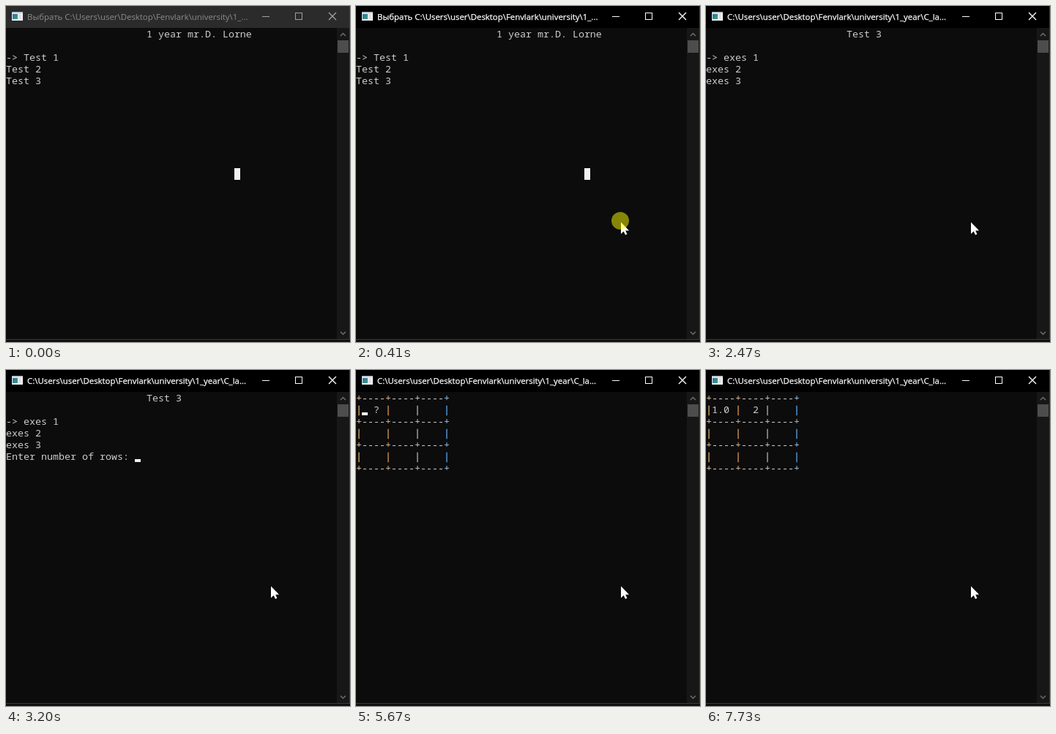
An HTML page that plays this animation: 470x460 px, repeating every 8000 ms.

```html
<!DOCTYPE html>
<html lang="en">
<head>
<meta charset="utf-8">
<title>Console menu</title>
<style>
  html, body { margin: 0; width: 100%; height: 100%; overflow: hidden; background: #0c0c0c; }
  svg { display: block; width: 470px; height: 460px; }
  text { white-space: pre; }
  .mono { font: 13.333px "Noto Sans Mono", "DejaVu Sans Mono", monospace; fill: #ccc; }
  #title { font: 11.4px "Open Sans", "Noto Sans", sans-serif; stroke-width: .25; }
  #bar { fill: #2b2b2b; }
  #title { fill: #8c8c8c; }
  #buttons { fill: none; stroke: #a0a0a0; }
  .active #bar { fill: #000; }
  .active #title { fill: #fff; stroke: #fff; }
  .active #buttons { stroke: #fff; }
  .plus { fill: color-mix(in srgb, var(--tint) 55%, #ddd); }
  .pipe { fill: var(--tint); stroke: var(--tint); stroke-width: .3; }
</style>
</head>
<body>
<svg id="win" viewBox="0 0 470 460">
  <defs>
    <linearGradient id="panel" x2="1" y2="1">
      <stop stop-color="#2a6cb0"/>
      <stop offset="1" stop-color="#43a078"/>
    </linearGradient>
  </defs>
  <rect width="470" height="460" fill="#0c0c0c"/>
  <rect id="bar" width="469" height="30"/>

  <g id="icon">
    <rect x="8" y="8" width="15" height="12" fill="#f0f2f3"/>
    <rect x="8" y="8" width="15" height="2" fill="#c4c8cb"/>
    <rect x="9" y="11" width="7" height="7" fill="url(#panel)"/>
    <rect x="17" y="11" width="4" height="7" fill="#dde5e9"/>
  </g>
  <text id="title" x="29" y="19"></text>
  <g id="buttons">
    <path d="M350 14.5h10M395.5 9.5h9v9h-9z" shape-rendering="crispEdges"/>
    <path d="M441 9l10 10M451 9l-10 10" stroke-width="1.35"/>
  </g>

  <g id="scrollbar">
    <rect x="452" y="30" width="17" height="426" fill="#171717"/>
    <rect x="453" y="47" width="15" height="17" fill="#4d4d4d"/>
    <path d="M457 41l3.5-3.5 3.5 3.5M457 446l3.5 3.5 3.5-3.5" fill="none" stroke="#6c6c6c" stroke-width="1.5"/>
  </g>
  <rect y="457" width="470" height="3" fill="#101010"/>
  <path d="M0 456.5h469.5V0" fill="none" stroke="#3a3a3a"/>

  <g id="grid" class="mono"></g>
  <g id="rows" class="mono"></g>
  <rect id="block" x="312" y="222" width="8" height="16" fill="#f2f2f2"/>
  <rect id="caret" width="8" height="4" fill="#f2f2f2"/>
  <path id="mouse" d="M0 0v16l3.7-3.6 2.3 5 2.4-1.1-2.2-4.9h4.9z" fill="#fff"/>
  <circle id="click" cx="361" cy="294" r="12" fill="#ff0" opacity=".5"/>
</svg>
<script>
const LOOP = 8000, CELL = 8, LINE = 16, TOP = 30, ROWS = 7;
const $ = id => document.getElementById(id);

function addText(parent, col, row, text = "") {
  const el = document.createElementNS("http://www.w3.org/2000/svg", "text");
  el.setAttribute("x", col * CELL);
  el.setAttribute("y", TOP + row * LINE + 13);
  el.textContent = text;
  parent.append(el);
  return el;
}

const lines = Array.from({ length: ROWS }, (_, i) => addText($("rows"), 0, i));

// Table borders, tinted by column like subpixel-smoothed stems
const tints = ["#e0b068", "#e09a50", "#b4b4b4", "#5aa8f0"];
for (let row = 0; row < ROWS; row++) {
  const rule = row % 2 === 0;
  tints.forEach((tint, i) => {
    const el = addText($("grid"), i * 5, row, rule ? "+" : "|");
    el.setAttribute("class", rule ? "plus" : "pipe");
    el.style.setProperty("--tint", tint);
    if (rule && i < 3) addText($("grid"), i * 5 + 1, row, "----");
  });
}

const menu = (head, name, pick) => [
  " ".repeat(24) + head, "",
  ...[1, 2, 3].map(n => (n === pick ? "-> " : "") + name + " " + n)
];
const path = "C:\\Users\\user\\Desktop\\Fenvlark\\university\\1_";
const year = "1 year mr.D. Lorne";
const exes = menu("Test 3", "exes", 1);
const askRows = "Enter number of rows: ";
const askCols = "Enter number of columns: ";

// [time, changes]; caret is [column, row]
const steps = [
  [0, { title: "Выбрать " + path + "...", rows: menu(year, "Test", 1), block: true }],
  [130, { mouse: [366, 320] }],
  [210, { mouse: [362, 296] }],
  [410, { active: true, click: true }],
  [480, { click: false }],
  [880, { caret: [0, 5] }],
  [1080, { title: path + "year\\C_la...", rows: [], block: false, caret: null }],
  [1150, { rows: menu(year, "Test", 3), caret: [0, 5] }],
  [1810, { rows: exes }],
  [2470, { caret: null }],
  [3000, { caret: [0, 5] }],
  [3200, { rows: [...exes, askRows], caret: [22, 5] }],
  [4060, { caret: null }],
  [4520, { rows: [...exes, askRows + "3"], caret: [23, 5] }],
  [4590, { caret: null }],
  [4920, { caret: [0, 6] }],
  [4990, { rows: [...exes, askRows + "3", askCols], caret: [25, 6] }],
  [5320, { rows: [...exes, askRows + "3", askCols + "3"], caret: [26, 6] }],
  [5670, { rows: ["", "   ?"], grid: true, caret: [1, 1] }],
  [6200, { caret: null }],
  [6600, { rows: ["", "   1"], caret: [1, 1] }],
  [6670, { caret: null }],
  [7270, { rows: ["", " 1.0    ?"], caret: [6, 1] }],
  [7600, { rows: ["", " 1.0    2"] }],
  [7730, { caret: null }]
];

const show = (id, on) => { $(id).style.display = on ? "" : "none"; };

function draw(t) {
  const s = Object.assign({}, ...steps.filter(step => step[0] <= t).map(step => step[1]));
  $("win").classList.toggle("active", !!s.active);
  $("title").textContent = s.title;
  lines.forEach((el, i) => { el.textContent = s.rows[i] || ""; });
  for (const id of ["grid", "block", "caret", "mouse", "click"]) show(id, s[id]);
  if (s.caret) {
    $("caret").setAttribute("x", s.caret[0] * CELL);
    $("caret").setAttribute("y", TOP + s.caret[1] * LINE + 12);
  }
  if (s.mouse) $("mouse").setAttribute("transform", `translate(${s.mouse})`);
}

const start = performance.now();
function tick(now) {
  draw(Math.max(0, now - start) % LOOP);
  requestAnimationFrame(tick);
}
draw(0);
requestAnimationFrame(tick);
</script>
</body>
</html>
```
